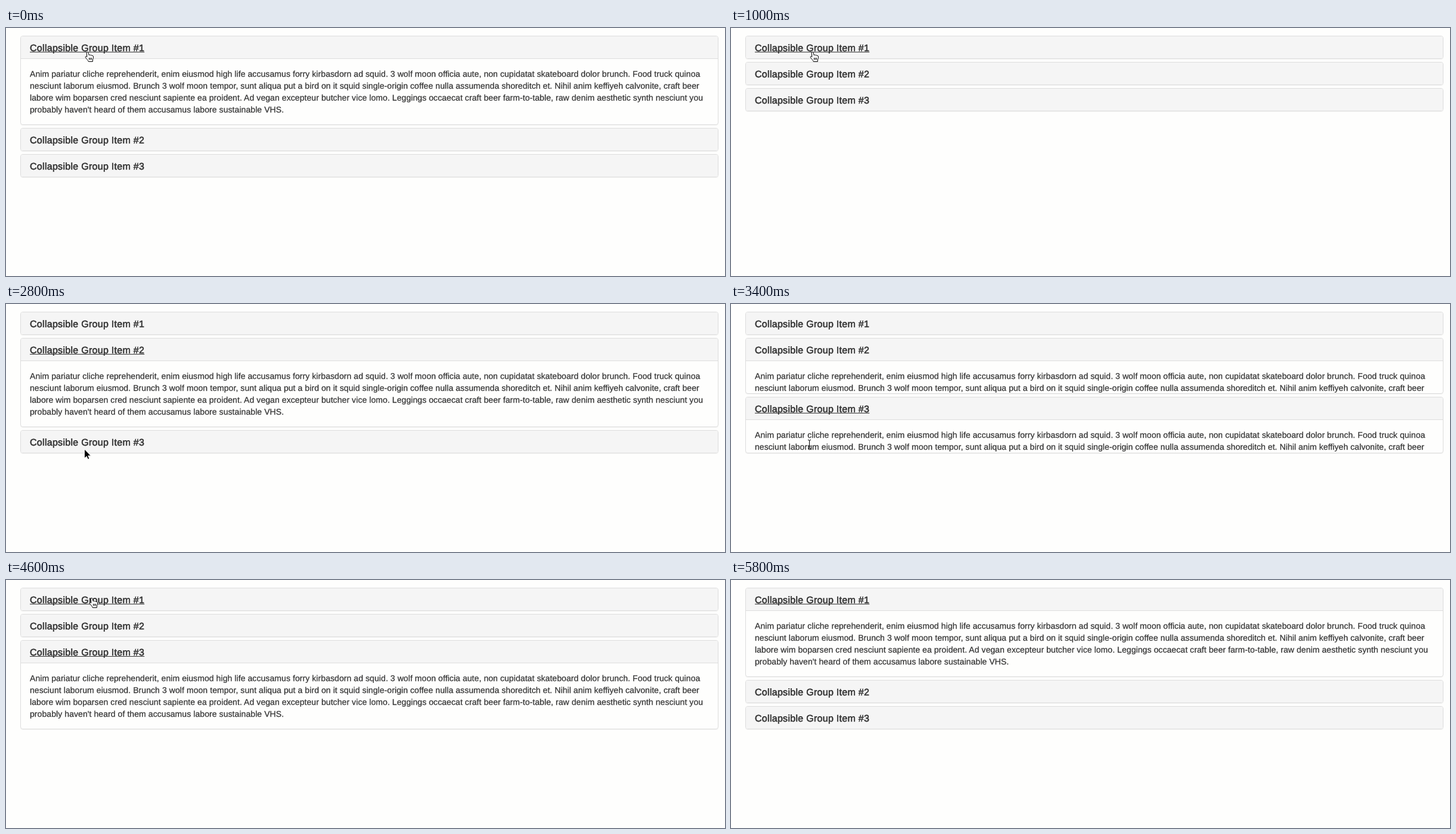
An HTML page for the animation above (6 s loop, 1206 px wide and 417 px high).

```html
<!DOCTYPE html>
<html lang="en">
<head>
<meta charset="utf-8">
<title>Accordion</title>
<style>
  html, body { margin: 0; width: 100%; height: 100%; overflow: hidden; background: #fefefd; }
  body {
    position: relative; color: #333;
    font: 14px/20px "Liberation Sans", Arial, sans-serif;
    text-rendering: geometricPrecision;
    -webkit-text-stroke: .25px #333;
  }
  .panel {
    position: absolute; left: 24px; width: 1171px; box-sizing: border-box; overflow: hidden;
    border: 1px solid #ddd; border-radius: 4px; box-shadow: 0 1px 1px rgba(0, 0, 0, .05);
  }
  h4 {
    margin: 0; padding: 12px 15px 8px; background: #f5f5f5;
    font-size: 16px; font-weight: 400; line-height: 17px; letter-spacing: .29px;
    -webkit-text-stroke: .6px #333;
  }
  h4 span { text-decoration: 1px none; text-underline-offset: 1px; text-decoration-skip-ink: none; }
  h4 .active { text-decoration-line: underline; }
  .text { border-top: 1px solid #ddd; padding: 15px; white-space: pre; letter-spacing: .075px; }
  svg { position: absolute; left: 0; top: 0; overflow: visible; stroke-linejoin: round; }
</style>
</head>
<body>
<svg width="1" height="1">
  <path id="hand" fill="#fff" stroke="#000" d="M-1.6 8.5L-2.3 1.8Q-2.2 .2 -.8 .3Q.4 .4 .7 1.6L1.6 5.6Q2.8 4.6 4 5.8Q5.3 5 6.3 6.3Q8.6 5.8 9 8Q9.3 11 8 13L7.8 16.5H.8Q.3 14.5 -1.5 12.8Q-3 11 -4.2 9.5Q-4.6 8 -3.4 7.7Q-2.4 7.7 -1.6 8.5ZM2 10v3.5M4 10v3.5M6 10v3.5"/>
  <path id="beam" fill="none" stroke="#000" d="M-2.5 -7.5Q0 -7.5 0 -6V6Q0 7.5 -2.5 7.5M2.5 -7.5Q0 -7.5 0 -6M0 6Q0 7.5 2.5 7.5M-1.5 3h3"/>
  <path id="arrow" stroke="#fff" d="M0 0V15.5L3.6 12.2 6 17.2 8.5 16.2 6.2 11.2H11Z"/>
</svg>
<script>
const LOOP = 6000, STEP = 200, SLIDE = 350;
const TOP = 13, CLOSED = 39, GAP = 5, BODY = 111;

const copy = `Anim pariatur cliche reprehenderit, enim eiusmod high life accusamus forry kirbasdorn ad squid. 3 wolf moon officia aute, non cupidatat skateboard dolor brunch. Food truck quinoa
nesciunt laborum eiusmod. Brunch 3 wolf moon tempor, sunt aliqua put a bird on it squid single-origin coffee nulla assumenda shoreditch et. Nihil anim keffiyeh calvonite, craft beer
labore wim boparsen cred nesciunt sapiente ea proident. Ad vegan excepteur butcher vice lomo. Leggings occaecat craft beer farm-to-table, raw denim aesthetic synth nesciunt you
probably haven't heard of them accusamus labore sustainable VHS.`;

// open: panel left open after the click, -1 for none
const clicks = [
  { time: -LOOP, item: 0, open: 0 },
  { time: 450, item: 0, open: -1 },
  { time: 1550, item: 1, open: 1 },
  { time: 3296, item: 2, open: 2 },
  { time: 4765, item: 0, open: 0 },
];

// Pointer hotspot: time, x, y
const path = [
  [0, 137, 40], [1000, 137, 40], [1400, 134, 82], [2200, 134, 82], [2800, 131, 244],
  [3000, 131, 236], [3600, 131, 236], [4200, 144, 30], [5200, 144, 30], [5600, 190, 365],
];

const panels = [1, 2, 3].map(n => {
  const box = document.createElement("div");
  box.className = "panel";
  box.innerHTML = `<h4><span>Collapsible Group Item #${n}</span></h4><div class="text">${copy}</div>`;
  document.querySelector("svg").before(box);
  return { box, link: box.querySelector("span") };
});
const cursors = document.querySelectorAll("svg path");

// CSS "ease" curve
function ease(x) {
  if (x >= 1) return 1;
  let low = 0, high = 1, s;
  for (let i = 0; i < 20; i++) {
    s = (low + high) / 2;
    if (.75 * s * (1 - s) + s ** 3 < x) low = s; else high = s;
  }
  return .3 * s * (1 - s) ** 2 + 3 * s * s * (1 - s) + s ** 3;
}

function pointerAt(t) {
  const i = path.findIndex(key => key[0] > t);
  if (i < 0) return path.at(-1).slice(1);
  const [a, b] = [path[i - 1], path[i]];
  const k = (t - a[0]) / (b[0] - a[0]);
  return [1, 2].map(j => a[j] + (b[j] - a[j]) * k);
}

function draw(t) {
  const last = clicks.findLastIndex(click => click.time <= t);
  const now = clicks[last], before = clicks[Math.max(last - 1, 0)];
  const grown = Math.round(BODY * ease((t - now.time) / SLIDE));
  const [x, y] = pointerAt(t);
  let top = TOP, cursor = "arrow";

  panels.forEach(({ box, link }, i) => {
    const body = now.open === i ? grown : before.open === i ? BODY - grown : 0;
    const over = (from, to, right) => x >= 40 && x <= right && y >= top + from && y <= top + to;
    const hover = over(11, 29, 232);
    if (hover) cursor = "hand";
    else if (over(54, Math.min(134, CLOSED + body), 1172)) cursor = "beam";
    link.classList.toggle("active", hover || now.item === i);
    box.style.top = top + "px";
    box.style.height = CLOSED + body + "px";
    top += CLOSED + body + GAP;
  });

  for (const shape of cursors) {
    shape.style.display = shape.id === cursor && t <= path.at(-1)[0] ? "" : "none";
    shape.setAttribute("transform", `translate(${Math.round(x) + .5} ${Math.round(y)})`);
  }
}

const start = performance.now();
function tick() {
  const t = (performance.now() - start) % LOOP;
  draw(Math.floor(t / STEP) * STEP);
  requestAnimationFrame(tick);
}
tick();
</script>
</body>
</html>
```
